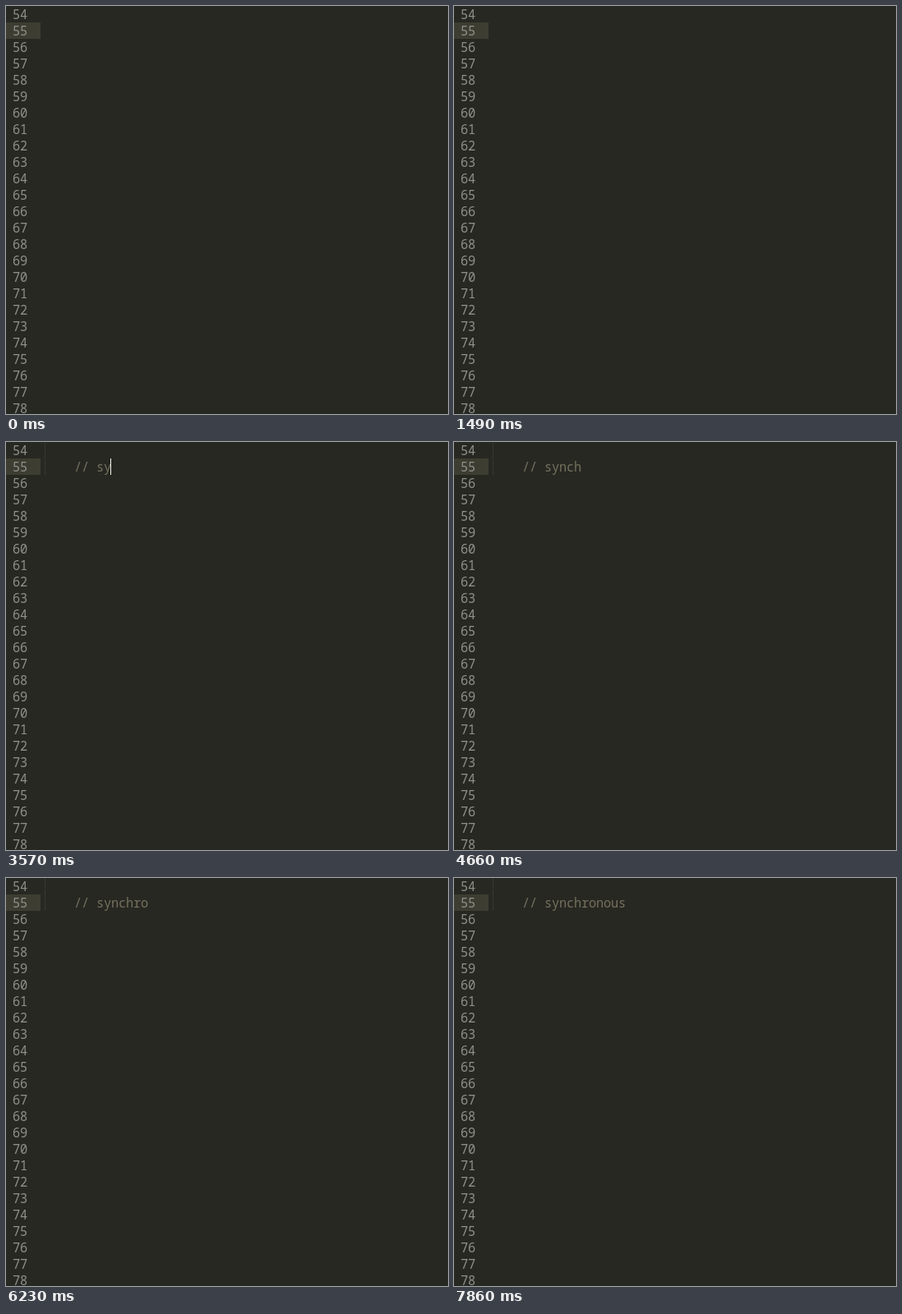
An HTML page with a canvas for the animation above (8000 ms loop, 538 px wide and 497 px high).

```html
<!DOCTYPE html>
<html lang="en">
<head>
<meta charset="utf-8">
<style>
  html, body { margin: 0; height: 100%; overflow: hidden; background: #272822; }
  canvas { display: block; }
</style>
</head>
<body>
<canvas id="stage" width="538" height="497"></canvas>
<script>
const ctx = document.getElementById('stage').getContext('2d', { alpha: false });
const LOOP = 8000, ROW = 20, CELL = 9, LEFT = 47, FIRST_LINE = 54;
const KEY_GAP = 125, BLINK = 1090, DELETE = '<';

// Bursts of quick typing: start time, then the input in steps of KEY_GAP
const bursts = [
  [-700, ''], [940, '    '], [2730, '// '], [3570, 'sy'], [3850, 'n', 'c'],
  [4200, 'h'], [4940, 'n'], [5450, DELETE, 'r', 'o'], [6750, 'n', 'o'], [7180, 'u', 's']
];
const keys = bursts.flatMap(([start, ...inputs]) =>
  inputs.map((input, i) => ({ time: start + i * KEY_GAP, input })));

// The caret is solid after a key, then fades out and in with one step between
function caretOpacity(age) {
  const phase = age % BLINK;
  if (phase < 380) return 1;
  return phase < 460 || phase > 970 ? .5 : 0;
}

function rect(color, x, y, w, h) {
  ctx.fillStyle = color;
  ctx.fillRect(x, y, w, h);
}

function write(color, text, x, row) {
  ctx.fillStyle = color;
  ctx.fillText(text, x, row * ROW + 16);
}

function draw(t) {
  const typed = keys.filter(key => key.time <= t);
  const text = typed.reduce((line, { input }) =>
    input === DELETE ? line.slice(0, -1) : line + input, '');

  rect('#272822', 0, 0, 538, 497);
  rect('#3e3d32', 0, ROW, 42, ROW);
  ctx.font = '15.4px "Noto Sans Mono", monospace';
  ctx.letterSpacing = '-0.24px';
  for (let row = 0; row < 25; row++) write('#8f908a', FIRST_LINE + row, 8, row);

  if (text.trim()) {
    for (let y = 1; y < 2 * ROW; y += 2) rect('#464741', LEFT, y, 1, 1);
    write('#75715e', text.trim(), LEFT + 4 * CELL, 1);
  }

  ctx.globalAlpha = caretOpacity(t - typed.at(-1).time);
  rect('#f8f8f0', LEFT - 1 + text.length * CELL, ROW, 1, ROW);
  ctx.globalAlpha = 1;
}

function tick() {
  draw(performance.now() % LOOP);
  requestAnimationFrame(tick);
}
tick();
</script>
</body>
</html>
```
